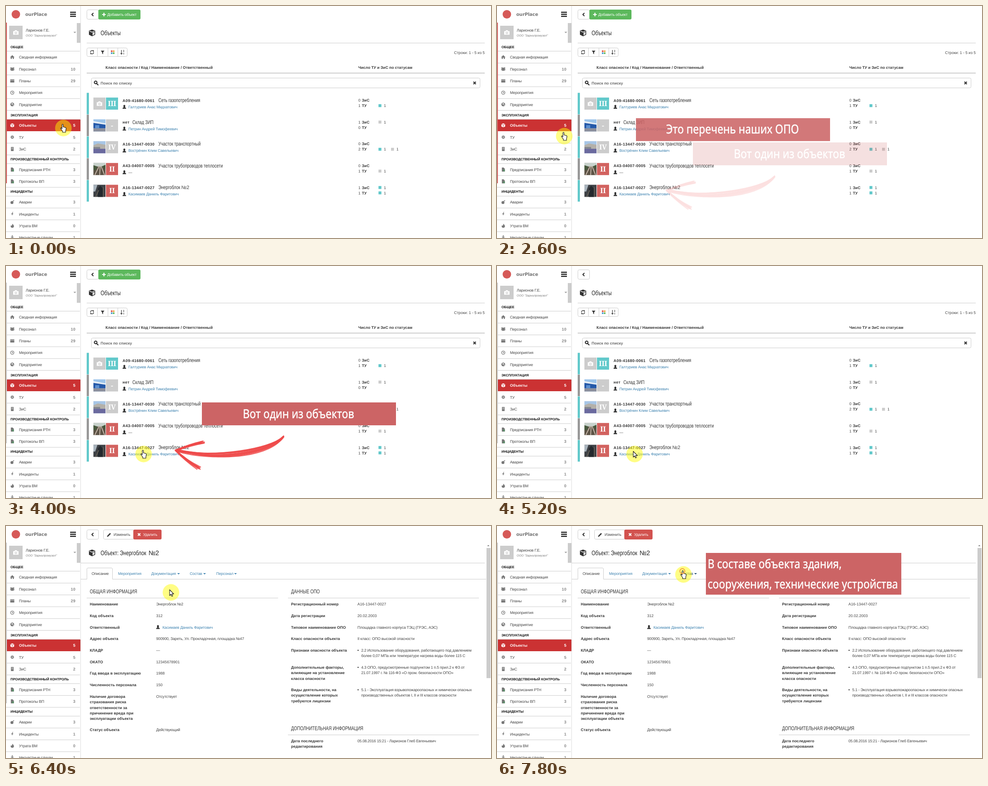
An HTML page that plays this animation: 1082x517 px, repeating every 8 s.

```html
<!DOCTYPE html>
<html lang="ru">
<head>
<meta charset="utf-8">
<title>Объекты</title>
<style>
html, body { margin: 0; width: 100%; height: 100%; overflow: hidden; background: #fff; }
svg { display: block; width: 1082px; height: 517px; }
text { font: 8.6px 'Liberation Sans', Arial, sans-serif; letter-spacing: -.18px; fill: #444; text-rendering: geometricPrecision; white-space: pre; }
.b { font-weight: bold; font-size: 8.5px; letter-spacing: .05px; fill: #333; }
.head { font-weight: bold; font-size: 7.5px; letter-spacing: 0; fill: #111; }
.code { font-weight: bold; font-size: 8.8px; letter-spacing: .4px; fill: #333; }
.count { font-weight: bold; font-size: 9px; letter-spacing: .2px; fill: #888; text-anchor: end; }
.num { letter-spacing: 0; }
.link { fill: #3f83b0; }
.w { fill: #fff; }
.n { font-size: 12px; letter-spacing: 0; fill: #333; transform: scaleX(.75); transform-box: fill-box; transform-origin: left; }
.big { font-size: 14.5px; fill: #222; }
.sec { font-size: 12.4px; }
.no { font-size: 11px; letter-spacing: 0; }
.org { font-size: 6.6px; font-style: italic; letter-spacing: 0; fill: #777; }
.brand { font: bold 10.2px 'DejaVu Sans', sans-serif; fill: #777; }
.roman { font: bold 16px 'Noto Serif', serif; fill: #fff; text-anchor: middle; }
.note { font: 27.5px 'Noto Sans', sans-serif; letter-spacing: 0; fill: #fff; stroke: #fff; stroke-width: .5; transform: scaleX(.84); transform-box: fill-box; transform-origin: left; }
.mid { text-anchor: middle; transform-origin: center; }
</style>
</head>
<body>
<svg viewBox="0 0 1082 517"></svg>
<script>
const RED = '#cb3233', TEAL = '#62c9cb', GREY = '#ccc', ROSE = '#cc6465', INK = '#333';

const rect = (x, y, w, h, fill, more = '') => `<rect x="${x}" y="${y}" width="${w}" height="${h}" fill="${fill}" ${more}/>`;
const text = (x, y, s, cls = '', more = '') => `<text x="${x}" y="${y}" class="${cls}" ${more}>${s}</text>`;
const path = (d, more = '') => `<path d="${d}" ${more}/>`;
const line = (d, color = GREY, width = 1) => path(d, `fill="none" stroke="${color}" stroke-width="${width}"`);
const disc = (x, y, r, fill = 'inherit') => `<circle cx="${x}" cy="${y}" r="${r}" fill="${fill}"/>`;
const at = (x, y, body, more = '') => `<g transform="translate(${x} ${y})" ${more}>${body}</g>`;
const group = (id, body) => `<g id="${id}">${body}</g>`;
const box = (x, y, w, h) => rect(x + .5, y + .5, w - 1, h - 1, '#fff', `rx="3" stroke="${GREY}"`);
const lines = (x, y, s, cls, step = 12.2) => s.split('|').map((part, i) => text(x, y + i * step, part, cls)).join('');
const caret = (x, y, fill = 'inherit') => path(`M${x - 3},${y - 1.5}h6l-3,3z`, `fill="${fill}"`);

const camera = path('M-6,-3h3l1.2,-2h3.6l1.2,2h3v8h-12z', 'fill="#fff"') + disc(0, .8, 2.6, GREY) + disc(0, .8, 1.4, '#fff');
const cube = path('M0,-7.5 7,-5V4L0,7.5 -7,4V-5z', `fill="${INK}"`) + line('M-6,-4 0,-1.8 6,-4', '#fff', 1.3) + path('M1.2,-.3 5.5,-2V3L1.2,5.5z', 'fill="#fff"');
const person = path('M-4,4.5q0,-2.6 2.8,-3.2q-1,-1 -1,-3q0,-2.6 2.2,-2.6t2.2,2.6q0,2 -1,3q2.8,.6 2.8,3.2z', `fill="${INK}"`);
const cross = line('M-2.7,-2.7 2.7,2.7M2.7,-2.7 -2.7,2.7', 'currentColor', 2.2);

const icons = {
  home: path('M-5,.3 0,-4.5 5,.3H3.5V4H1V1H-1V4H-3.5V.3z'),
  users: disc(-2.8, -2, 1.7) + disc(2.8, -2, 1.7) + disc(0, -1, 2) + path('M-5,2.5q0,-2.5 2.5,-2.5h5q2.5,0 2.5,2.5h-2v1.5h-6v-1.5z'),
  list: path('M-4.5,-3.5h9v1.6h-9zM-4.5,-1.2h9v5h-9z'),
  clock: line('M0,-3.8a3.8,3.8 0 1 0 .01,0zM0,-2.2V.4H2', '#777', 1.2),
  globe: disc(0, 0, 4.2) + path('M-1,-3 2,-2 0,0 -2,0zM1,.5 3,0 2,3z', 'fill="#fff"'),
  cube: path('M0,-4.5 4.2,-2.8V2.5L0,4.5 -4.2,2.5V-2.8z') + line('M-4,-2.5 0,-.8 4,-2.5M0,-.8V4', RED, .9),
  gear: disc(0, 0, 2.8) + line('M-4,0H4M0,-4V4M-2.8,-2.8 2.8,2.8M2.8,-2.8 -2.8,2.8', '#777', 1.3) + disc(0, 0, 1.2, '#fff'),
  house: path('M-3,-4.5h6v9h-6z') + line('M-2,-2.5H2M-2,0H2', '#fff', .8),
  file: path('M-3.2,-4.5h4l2.6,2.6v6.4h-6.6z') + path('M-.5,0h4v4h-4z', 'fill="#5a8f68"'),
  bomb: disc(-.7, 1, 3.3) + line('M1,-1.5 4,-4', '#777', 1.4),
  bolt: path('M1,-4.5 -2.5,.8H0L-1,4.5 2.5,-1H.2L2,-4.5z'),
  fire: path('M0,-4.5q4.5,3.5 3.5,7q-1,2 -3.5,2t-3.5,-2q-.5,-2.5 1,-4q.2,1.5 1.2,1.5q1.5,-1.5 1.3,-4.5z'),
  man: disc(0, -3.5, 1.4) + path('M-3,-1.5h6v1.3h-2v4.5h-2v-4.5h-2z')
};

function sidebar() {
  const item = (mid, icon, label, count = '') => {
    const on = label === 'Объекты';
    return (on ? rect(2, mid - 13, 164, 26, RED) : line(`M0,${mid + 13.2}H165`, GREY)) +
      at(14, mid, icons[icon], `fill="${on ? '#fff' : '#777'}"`) +
      text(29, mid + 3.2, label, on ? 'b w' : '') + text(155, mid + 3.3, count, 'count' + (on ? ' w' : ''));
  };
  const section = (y, title, first, items) => text(10, y, title, 'head') + line(`M0,${first - 13.3}H165`, GREY) +
    items.map((it, i) => item(first + i * 26.35, ...it)).join('');
  return section(94, 'ОБЩЕЕ', 114, [['home', 'Сводная информация'], ['users', 'Персонал', 10], ['list', 'Планы', 29], ['clock', 'Мероприятия'], ['globe', 'Предприятие']]) +
    section(245.5, 'ЭКСПЛУАТАЦИЯ', 266, [['cube', 'Объекты', 5], ['gear', 'ТУ', 5], ['house', 'ЗиС', 2]]) +
    section(344, 'ПРОИЗВОДСТВЕННЫЙ КОНТРОЛЬ', 364.5, [['file', 'Предписания РТН', 3], ['file', 'Протоколы ВП', 3]]) +
    section(416, 'ИНЦИДЕНТЫ', 437, [['bomb', 'Аварии', 3], ['bolt', 'Инциденты', 1], ['fire', 'Утрата ВМ', 0], ['man', 'Несчастные случаи', 1]]) +
    disc(22, 18.5, 9.5, '#d65a58') + text(43, 22, 'ourPlace', 'brand') +
    line('M143,14H156M143,18.5H156M143,23H156', '#222', 2.4) +
    rect(7, 44, 30, 30, GREY) + at(22, 59, camera) +
    text(44, 57, 'Ларионов Г.Е.') + text(44, 68, 'ООО "Зарнипромузел"', 'org') + caret(153.5, 59, '#999') +
    rect(158, 38, 8, 44, GREY) + line('M166.5,0V517', '#ddd') +
    rect(0, 37, 2, 358, GREY) + group('strip', rect(0, 37, 2, 358, '#d25a58'));
}

const topBar = box(180, 8, 27, 22) + line('M195,15.5 191.5,19 195,22.5', '#222', 1.8) + at(192, 60, cube);

const photos = {
  none: rect(0, 0, 27, 27, GREY) + at(13.5, 13.5, camera),
  depot: rect(0, 0, 27, 27, '#9cc4ea') + path('M0,5 27,10V20H0z', 'fill="#2458a8"') + path('M0,4 27,9V12L0,8z', 'fill="#e8eef4"') + rect(4, 13, 9, 7, '#5b8fd0') + rect(0, 20, 27, 7, '#8c8f9c'),
  yard: rect(0, 0, 27, 27, '#a8c6e6') + path('M0,9 10,5 27,8V18H0z', 'fill="#b4b1aa"') + rect(0, 13, 15, 4, '#82868e') + rect(0, 17, 27, 10, '#6b6a9e'),
  pipes: rect(0, 0, 27, 27, '#5d5346') + rect(0, 0, 27, 8, '#c8d2cc') + path('M0,5 9,8 6,16H0zM27,4 18,8 27,15z', 'fill="#47593e"') + line('M13,7 3,27M15,7 14,27M17,7 25,27', '#c2b3a6', 2),
  tower: rect(0, 0, 27, 27, '#3f4246') + path('M0,0H9L4,15H0z', 'fill="#a9b4bd"') + path('M10,27V8L15,2 21,8V27z', 'fill="#24292e"') + line('M5,27 12,12M22,5V27', '#6d6558', 1.5)
};

function listPage() {
  const tally = (y, n, label, marks) => text(786, y, n, 'num') + text(794, y, label, 'b') +
    marks.map((color, i) => rect(831 + i * 28, y - 6.5, 6.5, 6.5, color) + text(843 + i * 28, y, 1, 'num')).join('');
  const row = (photo, cls, color, bar, code, nameX, name, owner, a, aMarks, b, bMarks, i) => at(0, +(i * 48.6).toFixed(1),
    rect(180, 193.5, 5, 48, bar) + at(195, 204, photos[photo]) + rect(223, 204, 27, 27, color) + text(236.5, 223, cls, 'roman') +
    text(260, 213.5, code, 'code') + text(nameX, 214, name, 'n') + at(264, 224.5, person) + text(273, 228, owner, owner === '—' ? '' : 'link') +
    tally(213.3, a, 'ЗиС', aMarks) + tally(225.3, b, 'ТУ', bMarks));
  const rows = [
    ['none', 'III', TEAL, TEAL, 'A09-41680-0061', 340, 'Сеть газопотребления', 'Галтуриев Анас Мидхатович', 0, [], 1, [TEAL]],
    ['depot', '-', GREY, '#999', 'нет', 282, 'Склад ЗИП', 'Петрин Андрей Тимофеевич', 1, [GREY], 0, []],
    ['yard', 'IV', GREY, TEAL, 'A16-13447-0030', 340, 'Участок транспортный', 'Вострёнин Клим Савельевич', 0, [], 2, [TEAL, GREY]],
    ['pipes', 'II', '#d2625f', '#999', 'A43-04007-0005', 340, 'Участок трубопроводов теплосети', '—', 0, [], 1, [GREY]],
    ['tower', 'II', '#d2625f', TEAL, 'A16-13447-0027', 340, 'Энергоблок', 'Касимаев Даниль Фаритович', 1, [TEAL], 1, [TEAL]]
  ];
  return group('add', rect(206, 8, 94, 22, '#5cb85c', 'rx="3"') + line('M214.5,19H222.5M218.5,15V23', '#fff', 2.2) + text(226, 22, 'Добавить объект', 'w')) +
    text(211, 64.5, 'Объекты', 'n big') + line('M180,82.5H1068') +
    box(180, 93, 91, 20) + line('M204,93V113M227.5,93V113M249.5,93V113') +
    line('M188.5,102.5a3.5,3.5 0 0 1 6.5,-1.5V98.5M195.5,103.5a3.5,3.5 0 0 1 -6.5,1.5V107.5', INK, 1.4) +
    path('M211.5,99.5h8l-3,4v4l-2,-1.5v-2.5z', `fill="${INK}"`) +
    rect(234, 99, 3.5, 3.5, '#d9534f') + rect(238.5, 99, 3.5, 3.5, '#f0a33c') + rect(234, 103.5, 3.5, 3.5, '#4c9bd6') + rect(238.5, 103.5, 3.5, 3.5, '#5cb85c') +
    line('M257.5,98V107M255.5,105 257.5,107.5 259.5,105M261,99H264M261,102H264M261,106.5H264', INK, 1.2) +
    text(1068, 107, 'Строки: 1 - 5 из 5', 'num', 'text-anchor="end"') +
    text(222, 140, 'Класс опасности / Код / Наименование / Ответственный', 'b') + text(786, 140, 'Число ТУ и ЗиС по статусам', 'b') +
    line('M180,149.5H1068', GREY, 2) + box(190, 160, 868, 23) +
    line('M200,167.2a3,3 0 1 0 .01,0M202.5,173 206,176.5', '#222', 1.9) + text(211, 174.8, 'Поиск по списку', 'b', 'style="fill:#666"') +
    at(1045.5, 171.5, cross, `color="${INK}"`) +
    rows.map((r, i) => row(...r, i)).join('') + text(391, 408.4, '№2', 'no');
}

function detailPage() {
  const tab = (id, x, label, caretX) => `<g id="${id}" fill="#3f83b0">` + text(x, 109, label, 'link') + (caretX ? caret(caretX, 106.5) : '') + '</g>';
  const section = (x, y, title, end) => text(x + 7, y, title, 'n sec') + line(`M${x},${y + 11}H${end}`);
  const left = [
    [174, 'Наименование', 'Энергоблок №2'], [200, 'Код объекта', '312'], [225.5, 'Ответственный', ''],
    [251, 'Адрес объекта', '900900, Зареть, Ул. Прокладочная, площадка №47'], [277, 'КЛАДР', '—'], [302.5, 'ОКАТО', '12345678901'],
    [328, 'Год ввода в эксплуатацию', '1988'], [354, 'Численность персонала', '150'],
    [380, 'Наличие договора|страхования риска|ответственности за|причинение вреда при|эксплуатации объекта', 'Отсутствует'], [454, 'Статус объекта', 'Действующий']
  ];
  const right = [
    [174, 'Регистрационный номер', 'A16-13447-0027'], [200, 'Дата регистрации', '20.02.2003'],
    [225.5, 'Типовое наименование ОПО', 'Площадка главного корпуса ТЭЦ (ГРЭС, АЭС)'], [251, 'Класс опасности объекта', 'II класс: ОПО высокой опасности'],
    [277, 'Признаки опасности объекта', '2.2 Использование оборудования, работающего под давлением|более 0,07 МПа или температуре нагрева воды более 115 С'],
    [315, 'Дополнительные факторы,|влияющие на установление|класса опасности', '4.3 ОПО, предусмотренные подпунктом 1 п.5 прил.2 к ФЗ от|21.07.1997 г. № 116-ФЗ «О пром. безопасности ОПО»'],
    [365, 'Виды деятельности, на|осуществление которых|требуются лицензии', '5.1 - Эксплуатация взрывопожароопасных и химически опасных|производственных объектов I, II и III классов опасности'],
    [479, 'Дата последнего|редактирования', '05.08.2016 15:21 - Ларионов Глеб Евгеньевич']
  ];
  const field = (x, y, label, value) => {
    const bullet = value.includes('|');
    return lines(x, y + 3.2, label, 'b') + lines(x + 148 + (bullet ? 8.5 : 0), y + 3.2, value, /^[A-Z\d.-]+$/.test(value) ? 'num' : '') + (bullet ? disc(x + 149.5, y, 1.3, INK) : '');
  };
  return box(217, 8, 70, 22) + rect(284, 8, 63, 22, '#d2524f', 'rx="3"') +
    line('M227.5,22 233,16.5', INK, 2.6) + path('M225.5,24 226.3,21 228.5,23.2z') + text(240, 22, 'Изменить') +
    at(297, 19, cross, 'color="#fff"') + text(306, 22, 'Удалить', 'w') +
    text(211, 64.5, 'Объект: Энергоблок', 'n big') + text(318, 64.5, '№2', 'big') +
    line('M167,82.5H1068') + line('M167,118.5H180.5V96q0,-2.5 2.5,-2.5H235q2.5,0 2.5,2.5V118.5H1071') +
    text(191, 109, 'Описание') + tab('events', 250, 'Мероприятия') + tab('docs', 324, 'Документация', 385) + tab('parts', 410, 'Состав', 443) + tab('staff', 469, 'Персонал', 512) +
    section(180, 149.5, 'ОБЩАЯ ИНФОРМАЦИЯ', 607) + section(629, 149.5, 'ДАННЫЕ ОПО', 1055) + section(629, 454.5, 'ДОПОЛНИТЕЛЬНАЯ ИНФОРМАЦИЯ', 1055) +
    left.map(f => field(187, ...f)).join('') + right.map(f => field(636, ...f)).join('') +
    at(339, 225, person) + text(349, 228.7, 'Касимаев Даниль Фаритович', 'link') +
    rect(1072, 49, 9, 290, GREY) + path('M1073.5,45h5l-2.5,-3z', 'fill="#888"');
}

// Brush arrow: overlapping strokes with small seeded offsets
function brushArrow() {
  let seed = 7;
  const jit = k => +(((seed = seed * 16807 % 2147483647) / 2147483647 - .5) * k).toFixed(1);
  let out = '';
  for (let i = 0; i < 11; i++) {
    const o = (i - 5) * 1.1;
    out += path(`M${619 + jit(3)},${380 + jit(4)}C${590 + o},${414 + o * 1.2} ${480 + jit(20)},${434 + o * 1.4} ${381 + jit(5)},${411 + jit(4)}`) +
      path(`M${438 + jit(10)},${392 + jit(7)}Q${408 + jit(6)},${398 + jit(7)} ${379 + jit(3)},${411 + jit(3)}Q${402 + jit(7)},${434 + jit(7)} ${430 + jit(8)},${450 + jit(7)}`);
  }
  return `<g fill="none" stroke="#ef4b4b" stroke-width="2.3" stroke-linecap="round" stroke-opacity=".85">${out}</g>`;
}

document.querySelector('svg').innerHTML =
  sidebar() + topBar + group('list', listPage()) + group('detail', detailPage()) +
  group('note1', rect(310, 250, 433, 51, ROSE) + text(525.5, 284, 'Это перечень наших ОПО', 'note mid')) +
  group('note2', rect(437, 304, 433, 51, ROSE) + text(652.5, 338.5, 'Вот один из объектов', 'note mid')) +
  group('arrow', brushArrow()) +
  group('note3', rect(466, 60, 436, 93, ROSE) + lines(470, 94, 'В составе объекта здания,|сооружения, технические устройства', 'note', 45)) +
  group('cursor', disc(0, 0, 18.5, 'rgba(255,250,0,.48)') +
    '<g fill="#fff" stroke="#111" stroke-width="1.1" stroke-linejoin="round">' +
    group('hand', path('M-3,-7q0,-1.5 1.3,-1.5t1.3,1.5v4.5l4.5,1q2.2,.5 2,2.8l-1,4.5v3.5h-7v-2.5l-4,-5.5q-.8,-1.8 1,-1.8l1.9,1.8z')) +
    group('pointer', path('M-3,-6v13l3,-2.8 2,4.6 2,-.9 -2,-4.5h4.2z')) + '</g>') +
  '<circle id="ripple" cx="413.5" cy="100.5" fill="none" stroke="#f5a040" stroke-width="2"/>';

const $ = id => document.getElementById(id);
const ramp = (t, a, b) => Math.min(1, Math.max(0, (t - a) / (b - a)));
const show = (id, opacity) => $(id).setAttribute('opacity', +opacity);

const route = [[0, 128, 272], [2400, 128, 272], [2600, 150, 290], [2800, 220, 347], [3000, 285, 402], [3200, 302, 415], [3400, 307, 419],
  [5400, 307, 419], [5600, 317, 382], [6000, 345, 240], [6400, 368, 148], [6800, 383, 121], [7000, 405, 111], [7200, 416, 108], [8000, 416, 108]];

function cursorAt(t) {
  const i = route.findIndex(p => p[0] > t), [t0, x0, y0] = route[i - 1], [t1, x1, y1] = route[i];
  const k = (t - t0) / (t1 - t0);
  return [x0 + (x1 - x0) * k, y0 + (y1 - y0) * k];
}

function hover(id, on) {
  const color = on ? '#1d4a70' : '#3f83b0';
  $(id).setAttribute('fill', color);
  $(id).querySelector('text').style.fill = color;
}

function draw(now) {
  const t = Math.floor(now % 8000 / 200) * 200;
  const detail = t >= 5400, hand = t < 5200 || t >= 6800, away = 1 - ramp(t, 4500, 5000);
  show('strip', 1 - ramp(t, 2500, 4000));
  show('list', !detail);
  show('add', t < 5200);
  show('detail', detail);
  show('note1', ramp(t, 900, 1100) * (1 - ramp(t, 2500, 3250)));
  show('note2', ramp(t, 2500, 3000) * away);
  show('arrow', ramp(t, 2500, 3100) * away);
  show('note3', ramp(t, 6500, 6700));
  show('hand', hand);
  show('pointer', !hand);
  $('cursor').setAttribute('transform', `translate(${cursorAt(t)})`);
  hover('docs', t === 6800);
  hover('parts', t >= 7000);
  $('ripple').setAttribute('r', t < 7800 ? 3.5 : 5.5);
  show('ripple', t >= 7600);
  requestAnimationFrame(draw);
}
requestAnimationFrame(draw);
</script>
</body>
</html>
```
